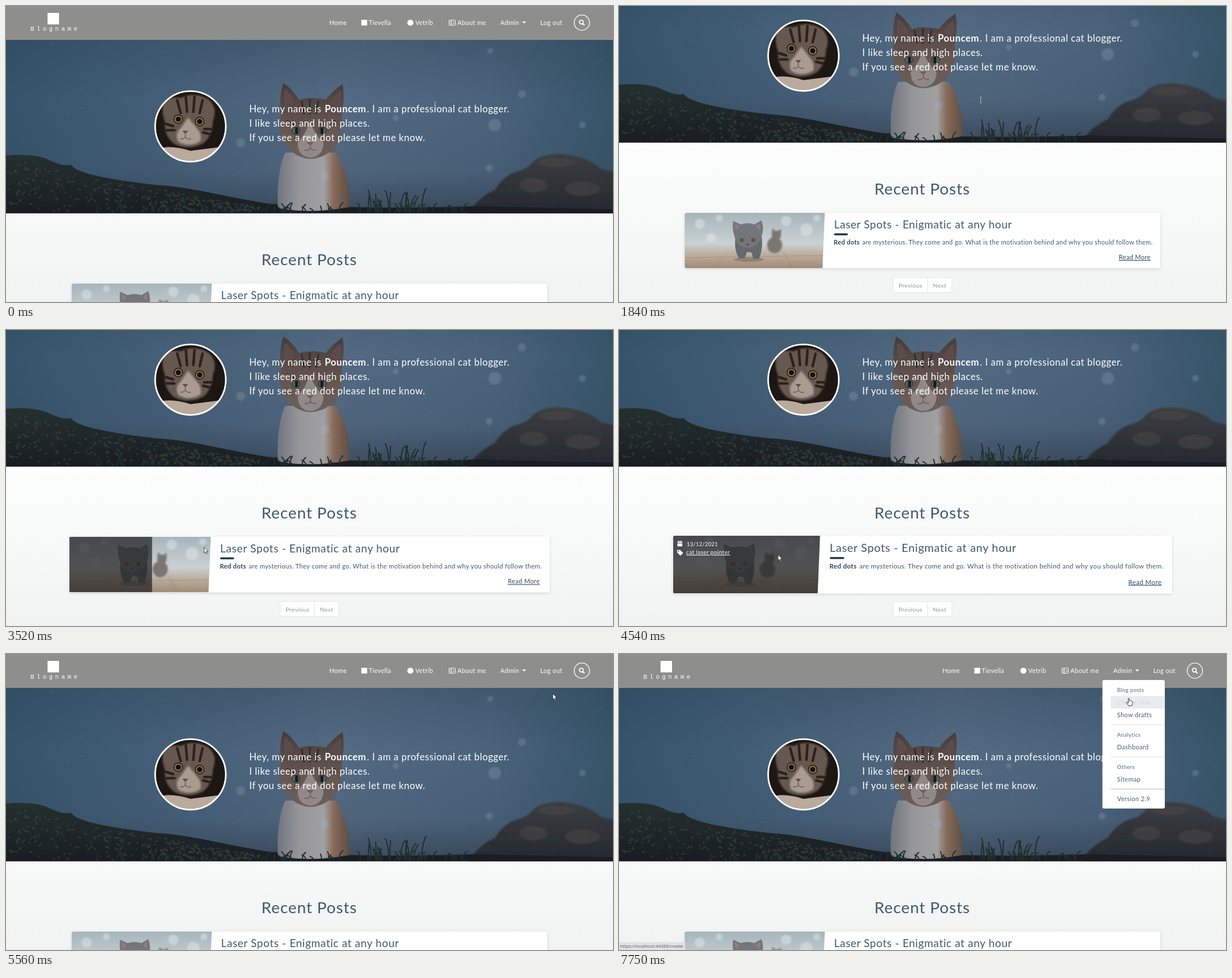
These frames come from a looping animation (1053x515 px, 8000 ms). An HTML page:

```html
<!DOCTYPE html>
<html lang="en">
<head>
<meta charset="utf-8">
<title>Blog</title>
<style>
html, body { margin: 0; width: 100%; height: 100%; overflow: hidden; background: #fff; }
svg { position: absolute; left: 0; top: 0; width: 100%; height: 100%; display: block; }
text { font-family: Lato, "Open Sans", sans-serif; font-size: 10.9px; letter-spacing: .031em; white-space: pre; }
.nav text { fill: #fff; }
.hero text { fill: #fff; font-size: 16.5px; }
.bold { font-weight: 700; }
.ink { fill: #3f5a70; }
text.h1 { font-size: 27.6px; }
text.h2 { font-size: 18.8px; }
text.page { font-size: 10.3px; fill: #8d9994; }
text.head { font-size: 9.6px; fill: #566d7a; }
text.item { fill: #4a6271; }
text.item.on { fill: #d3d9cc; }
text.logo { font: 10.5px "Liberation Mono", monospace; letter-spacing: 4.4px; }
#status { position: absolute; left: 0; bottom: 0; height: 14px; box-sizing: border-box; padding: 0 4px 0 2px;
  font: 7.8px/14px "Open Sans", sans-serif; color: #555a5e; background: #dfe1e4; border-radius: 0 2px 0 0; white-space: nowrap; }
</style>
</head>
<body>
<svg viewBox="0 0 1053 515" preserveAspectRatio="none">
  <defs>
    <linearGradient id="paper" x2="0" y2="1"><stop offset=".4" stop-color="#fff"/><stop offset="1" stop-color="#f1f3f3"/></linearGradient>
    <linearGradient id="sky"><stop stop-color="#35536a"/><stop offset=".25" stop-color="#445f77"/><stop offset=".55" stop-color="#536a82"/><stop offset=".8" stop-color="#4a637b"/><stop offset="1" stop-color="#375469"/></linearGradient>
    <linearGradient id="dusk" x2="0" y2="1"><stop stop-color="#2a4152" stop-opacity=".3"/><stop offset=".35" stop-color="#2a4152" stop-opacity="0"/><stop offset=".75" stop-color="#2a3542" stop-opacity=".1"/><stop offset="1" stop-color="#222a33" stop-opacity=".5"/></linearGradient>
    <linearGradient id="rock" x2="0" y2="1"><stop stop-color="#3b3d41"/><stop offset="1" stop-color="#23282d"/></linearGradient>
    <linearGradient id="soil" x2="0" y2="1"><stop stop-color="#24302f"/><stop offset="1" stop-color="#191d22"/></linearGradient>
    <linearGradient id="fur" x2="0" y2="1"><stop stop-color="#463c3c"/><stop offset=".6" stop-color="#66564f"/><stop offset="1" stop-color="#6b5f5b"/></linearGradient>
    <linearGradient id="chest"><stop stop-color="#70757e"/><stop offset=".3" stop-color="#969599"/><stop offset=".65" stop-color="#a09fa1"/><stop offset=".78" stop-color="#866a58"/><stop offset="1" stop-color="#5f4e45"/></linearGradient>
    <linearGradient id="room" x2="0" y2="1"><stop stop-color="#a6b5bb"/><stop offset=".55" stop-color="#c9d1d3"/><stop offset=".72" stop-color="#bfb4a6"/><stop offset="1" stop-color="#a08a75"/></linearGradient>
    <filter id="soft"><feGaussianBlur stdDeviation="1.6"/></filter>
    <filter id="shade" x="-5%" y="-20%" width="110%" height="150%"><feDropShadow dx="0" dy="1.5" stdDeviation="2.5" flood-opacity=".14"/></filter>
    <clipPath id="heroClip"><path d="M0 59H1053V360.500H0z"/></clipPath>
    <clipPath id="faceClip"><circle cx="320" cy="209.500" r="61"/></clipPath>
    <clipPath id="photoClip"><path d="M117 483H357L353 579H117q-3 0-3-3V486q0-3 3-3z"/></clipPath>
  </defs>

  <rect width="1053" height="515" fill="url(#paper)"/>

  <g id="site">
    <g class="hero" clip-path="url(#heroClip)">
      <rect y="59" width="1053" height="302" fill="url(#sky)"/>
      <rect y="59" width="1053" height="302" fill="url(#dusk)"/>
      <g filter="url(#soft)">
        <path d="M800 365Q815 335 848 320Q862 296 885 288Q905 284 915 270Q935 255 965 258Q1010 262 1030 282L1060 290V365z" fill="url(#rock)"/>
        <g fill="#4c4848" opacity=".55"><ellipse cx="955" cy="272" rx="32" ry="8"/><ellipse cx="915" cy="312" rx="24" ry="12"/><ellipse cx="1000" cy="318" rx="30" ry="12"/></g>
      </g>
      <path d="M0 260Q50 256 75 268T112 276Q122 290 180 300T270 312T360 326T450 343T600 350T820 348L1053 354V361H0z" fill="url(#soil)"/>
      <g id="cat">
        <path d="M484 255Q468 295 472 352Q530 362 595 350Q600 300 572 255z" fill="url(#chest)"/>
        <path d="M481 134Q473 160 477 190Q470 220 487 245Q505 265 528 266Q556 264 572 244Q586 222 582 192Q588 160 584 136Q568 146 555 163Q530 157 508 163Q497 144 481 134z" fill="url(#fur)"/>
        <path d="M484 145Q480 165 484 180L501 166Q493 152 484 145zM580 147Q584 166 579 180L562 167Q572 153 580 147z" fill="#5d4b4b"/>
        <path d="M527 200Q521 222 506 238Q506 262 528 264Q550 262 551 238Q534 222 527 200z" fill="#918987"/>
        <path d="M513 166L517 187M527 163V188M542 166L538 187M488 200L500 207M570 200L558 207" stroke="#352d2e" stroke-width="3" stroke-linecap="round"/>
        <g fill="#4b6663" stroke="#232629"><ellipse cx="503" cy="217" rx="7" ry="6"/><ellipse cx="549" cy="217" rx="7" ry="6"/></g>
        <path d="M504 214v6M548 214v6" stroke="#161a1d" stroke-width="5" stroke-linecap="round"/>
        <path d="M521 237H534L528 243z" fill="#7a5a57"/>
        <path d="M528 243V248M518 251Q525 252 528 248Q532 252 538 251" fill="none" stroke="#4d4040"/>
      </g>
      <path id="leaves" stroke="#33463a" stroke-width="3" stroke-linecap="round" opacity=".65"/>
      <path id="twigs" stroke="#413c3b" stroke-width="2.500" stroke-linecap="round" opacity=".65"/>
      <path id="blades" fill="none" stroke="#202f2d" stroke-width="2" stroke-linecap="round"/>
      <g fill="#a9bccb" opacity=".22" filter="url(#soft)"><circle cx="848" cy="207" r="11"/><circle cx="407" cy="238" r="8"/><circle cx="553" cy="296" r="8"/><circle cx="895" cy="153" r="7"/><circle cx="1000" cy="207" r="6"/><circle cx="840" cy="78" r="5"/><circle cx="676" cy="195" r="5"/><circle cx="838" cy="282" r="6"/></g>
      <path id="flakes" stroke="#b4c3d0" stroke-width="1.300" stroke-linecap="round" opacity=".35"/>

      <g clip-path="url(#faceClip)">
        <rect x="257" y="147" width="126" height="126" fill="#1d1714"/>
        <path d="M257 250Q285 240 320 252L383 244V273H257z" fill="#b9aa9c"/>
        <g filter="url(#soft)">
          <path d="M275 162Q268 182 276 202Q274 226 292 240Q318 252 342 239Q358 226 359 200Q368 178 352 163Q328 148 303 160Q288 158 275 162z" fill="#66594f"/>
          <path d="M304 212Q292 222 299 236Q318 247 337 235Q340 222 330 212L316 194z" fill="#a89c91"/>
        </g>
        <path d="M297 164L303 186M312 158L314 184M327 158L325 184M341 164L336 186M277 205L290 209M279 216L292 216M356 214L344 214M354 223L342 220" stroke="#2c221d" stroke-width="4.500" stroke-linecap="round"/>
        <g fill="#94794f" stroke="#1b1512" stroke-width="1.500"><circle cx="299" cy="197" r="7.500"/><circle cx="336" cy="201" r="7.500"/></g>
        <circle cx="299" cy="197" r="4.500" fill="#14100e"/><circle cx="336" cy="201" r="4.500" fill="#14100e"/>
        <path d="M306 217H316L311 223z" fill="#6d4b43"/>
        <path d="M311 223V228M302 231Q309 232 311 228Q315 233 321 231" fill="none" stroke="#4a3a32"/>
      </g>
      <circle cx="320" cy="209.500" r="61.300" fill="none" stroke="#fff" stroke-width="2.800"/>
      <text x="422" y="185">Hey, my name is</text>
      <text x="553" y="185" class="bold">Pouncem</text>
      <text x="626" y="185">. I am a professional cat blogger.</text>
      <text x="422" y="210">I like sleep and high places.</text>
      <text x="422" y="234.500">If you see a red dot please let me know.</text>
    </g>

    <g class="nav">
      <rect width="1053" height="59" fill="#8e8e8d"/>
      <rect x="72" y="12" width="20" height="20" fill="#fff"/>
      <text x="42.500" y="43" class="logo">Blogname</text>
      <text x="561" y="33">Home</text>
      <rect x="616.500" y="24" width="10" height="10" fill="#fff"/>
      <text x="629" y="33">Tievella</text>
      <circle cx="701.500" cy="29" r="5.300" fill="#fff"/>
      <text x="710" y="33">Vetrib</text>
      <g fill="none" stroke="#fff"><rect x="768.500" y="24.500" width="11" height="9" rx="1"/><path d="M775.500 28h2.500M775.500 30.500h2.500"/></g>
      <circle cx="772" cy="27.500" r="1.400" fill="#fff"/><path d="M769.800 32q2.200-4 4.400 0z" fill="#fff"/>
      <text x="783" y="33">About me</text>
      <text x="857.500" y="33">Admin</text>
      <path d="M895.500 27H902.500L899 30.500z" fill="#fff"/>
      <text x="927" y="33">Log out</text>
      <g fill="none" stroke="#fff"><circle cx="999" cy="29" r="13.300" stroke-width="1.300"/><circle cx="998" cy="28" r="3.300" stroke-width="1.800"/><path d="M1000.500 30.500L1003.500 33.500" stroke-width="2.200"/></g>
    </g>

    <text x="443" y="451" class="h1 ink">Recent Posts</text>

    <g id="card">
      <rect x="114" y="483" width="825" height="96" rx="3" fill="#fff" filter="url(#shade)"/>
      <g clip-path="url(#photoClip)">
        <rect x="114" y="483" width="244" height="96" fill="url(#room)"/>
        <g fill="#e6eced" opacity=".45" filter="url(#soft)"><circle cx="140" cy="502" r="9"/><circle cx="174" cy="492" r="6"/><circle cx="160" cy="526" r="8"/><circle cx="290" cy="497" r="9"/><circle cx="325" cy="512" r="11"/><circle cx="343" cy="492" r="6"/></g>
        <path d="M114 561L358 557M165 579L190 550M300 579L285 550" stroke="#8b7562" opacity=".4"/>
        <g fill="#7b7672" filter="url(#soft)"><ellipse cx="270" cy="539" rx="13" ry="14"/><circle cx="273" cy="522" r="8"/><path d="M265 521L266 510L273 516L281 511L281 522z"/></g>
        <ellipse cx="225" cy="564" rx="26" ry="4" fill="#6f5b4c" opacity=".45"/>
        <path d="M203 520Q198 545 208 562H218L222 551L230 552L233 563H243Q252 540 246 518z" fill="#65686d"/>
        <path d="M198 497Q196 512 200 522Q203 541 223 544Q243 542 248 522Q252 508 247 496L235 503Q223 499 211 503z" fill="#73767b"/>
        <path d="M201 502L202 514L209 506zM245 501L245 513L237 506z" fill="#927f7d"/>
        <g fill="#c99b55" stroke="#313338"><circle cx="213" cy="530" r="3.200"/><circle cx="233" cy="530" r="3.200"/></g>
        <circle cx="213" cy="530" r="1.500"/><circle cx="233" cy="530" r="1.500"/>
        <path d="M220 537H226L223 540z" fill="#3c3d41"/>
        <g id="cover">
          <rect x="114" y="483" width="245" height="96" fill="#222" opacity=".72"/>
          <g fill="#fff">
            <path d="M121 493h1.500v-1.500h1.500v1.500h2v-1.500h1.500v1.500h1.500v2h-8zM121 496h8v5h-8z"/>
            <path d="M120.500 507h5l5 5l-4.500 4.500l-5.500-5.500z"/><circle cx="122.800" cy="509.200" r="1" fill="#444"/>
            <text x="136.500" y="500.500" style="font-size:8.800px">13/12/2021</text>
            <text x="135.500" y="514" style="font-size:9.600px" text-decoration="underline">cat laser pointer</text>
          </g>
        </g>
      </g>
      <text x="373" y="510" class="h2 ink">Laser Spots - Enigmatic at any hour</text>
      <rect x="373" y="518.500" width="24" height="3.500" rx="1.700" fill="#233f45"/>
      <text x="372.500" y="538" class="bold" fill="#2c4558">Red dots</text>
      <text x="422" y="538" class="ink">are mysterious. They come and go. What is the motivation behind and why you should follow them.</text>
      <text x="867" y="564" fill="#2f4a5f" text-decoration="underline">Read More</text>
    </g>

    <rect x="475.500" y="595.500" width="102" height="26" rx="3" fill="#fff" stroke="#e2e5e6"/>
    <path d="M535.500 596V621" stroke="#e2e5e6"/>
    <text x="485" y="612.500" class="page">Previous</text>
    <text x="544.500" y="612.500" class="page">Next</text>
  </g>

  <g id="menu">
    <rect x="838.500" y="45" width="108.500" height="224" rx="3" fill="#fff" stroke="#000" stroke-opacity=".15"/>
    <rect id="glow" x="853" width="94" height="22" fill="#e9ecef"/>
    <path d="M853 123H947M853 179H947" stroke="#dcdfe1"/><path d="M853 235H947" stroke="#b9bcbe"/>
    <text x="864" y="65.500" class="head">Blog posts</text>
    <text x="864" y="88" class="item" data-link="create">Create new</text>
    <text x="864" y="110" class="item" data-link="drafts">Show drafts</text>
    <text x="864" y="143.500" class="head">Analytics</text>
    <text x="864" y="166" class="item" data-link="dashboard">Dashboard</text>
    <text x="864" y="199.500" class="head">Others</text>
    <text x="864" y="222" class="item" data-link="sitemap">Sitemap</text>
    <text x="864" y="256" class="item">Version 2.9</text>
  </g>
</svg>
<div id="status"></div>
<svg viewBox="0 0 1053 515" preserveAspectRatio="none">
  <g id="pointer">
    <path id="beam" d="M-2-5H-.6L0-4.500L.6-5H2M0-4.500V4.500M-2 5H-.6L0 4.500L.6 5H2" fill="none" stroke="#b3bac0"/>
    <path id="arrow" d="M0 0V10L2.300 7.900L3.900 11.500L5.500 10.800L4 7.300H7z" fill="#fff" stroke="#222" stroke-width=".8"/>
    <path id="hand" d="M-1 1Q0-.5 1 1V5Q2.300 4 3 5.200Q4.300 4.500 5 6Q6.300 5.600 6.300 7V10L5 13.500H-.5L-4 8.500Q-3.800 6.800-2.300 7.800L-1 9z" fill="#fff" stroke="#222" stroke-width=".9"/>
  </g>
</svg>
<script>
const LOOP = 8000, STEP = 170;
const $ = id => document.getElementById(id);

// Bursts of picture changes: start, end, count
const starts = [
  [0, 0, 1], [170, 320, 2], [1150, 1840, 5], [2490, 3520, 7], [3690, 4710, 7],
  [4880, 5900, 7], [6070, 6070, 1], [6400, 6740, 3], [7070, 7750, 5]
].flatMap(([a, b, n]) => Array.from({ length: n }, (_, i) => i === n - 1 ? b : a + STEP * i));

// Tracks: time, then values
const scroll = [[1320, 0], [1490, 2], [1660, 72], [1830, 123], [4540, 123], [4710, 72], [4880, 9], [5050, 0]];
const grow = [[3340, 0], [3520, .2], [3690, .76], [3860, .97], [4540, .97], [4710, .8], [4880, .24], [5050, 0]];
const slide = [[3340, 0], [3520, .58], [3690, 1], [4540, 1], [4710, .5], [4880, 0]];
const path = [
  [0, 744.5, 172], [170, 740, 172], [320, 737.5, 172], [980, 737.5, 172], [1150, 705, 168], [1320, 640, 164],
  [1490, 626.5, 163], [1840, 627.5, 163.5], [2320, 627.5, 163.5], [2490, 622, 215], [2660, 600, 335],
  [2830, 530, 465], [3010, 430, 500], [3180, 380, 490], [3340, 352, 462], [3520, 343.5, 378],
  [3690, 320, 386], [4030, 285, 391], [4540, 276, 391], [4710, 284, 386], [4880, 420, 310], [5050, 600, 220],
  [5220, 790, 130], [5390, 920, 85], [5560, 948.5, 69], [5730, 935, 52], [5900, 903, 32], [6070, 893, 26],
  [6240, 893, 26], [6400, 889, 60], [6570, 886, 140], [6740, 884, 215], [6900, 884, 215],
  [7070, 884, 200], [7240, 884, 160], [7410, 884, 118], [7580, 884, 86], [7750, 884.5, 76.5]
];
const shapes = [[0, 'beam'], [1490, 'arrow'], [1660, 'beam'], [2490, 'arrow'], [5900, 'hand'], [6400, 'arrow'],
  [6740, 'hand'], [7070, 'arrow'], [7240, 'hand'], [7410, 'arrow'], [7580, 'hand']];
const links = [[0, ''], [6070, '#'], [6740, 'sitemap'], [7070, ''], [7240, 'dashboard'], [7410, ''], [7580, 'create']];

const held = (keys, t) => keys.findLast(k => k[0] <= t)[1];

function at(keys, t) {
  const i = keys.findIndex(k => k[0] > t);
  if (i === 0) return keys[0].slice(1);
  if (i < 0) return keys.at(-1).slice(1);
  const a = keys[i - 1], b = keys[i], f = (t - a[0]) / (b[0] - a[0]);
  return a.slice(1).map((v, j) => v + (b[j + 1] - v) * f);
}

let seed = 7;
const rnd = (a, b) => {
  seed = (seed * 16807) % 2147483647;
  return a + (b - a) * seed / 2147483647;
};
const scatter = (id, n, make) => $(id).setAttribute('d', Array.from({ length: n }, make).join(''));
const ground = x => Math.min(346, 264 + x * .19);
const bit = () => {
  const x = rnd(0, 440);
  return `M${x} ${rnd(ground(x) + 4, 358)}l${rnd(-4, 4)} ${rnd(-3, 3)}`;
};

scatter('leaves', 170, bit);
scatter('twigs', 110, bit);
scatter('flakes', 150, () => `M${rnd(0, 1053)} ${rnd(62, 350)}h.01`);
scatter('blades', 85, (_, i) => {
  const tuft = i < 22;
  const x = tuft ? rnd(625, 725) : rnd(150, 820);
  const h = tuft ? rnd(12, 42) : rnd(5, 16);
  const lean = rnd(-11, 11);
  return `M${x} 358q${lean * .1} ${-h * .7} ${lean} ${-h}`;
});

const items = [...document.querySelectorAll('[data-link]')];

function draw(now) {
  const clock = now % LOOP;
  const t = starts.findLast(s => s <= clock);
  const k = 1 + .05 * at(grow, t)[0];
  const [x, y] = at(path, t);
  const shape = held(shapes, t), link = held(links, t);

  $('site').setAttribute('transform', `translate(0 ${-at(scroll, t)[0]})`);
  $('card').setAttribute('transform', `translate(526.5 531) scale(${k}) translate(-526.5 -531)`);
  $('cover').setAttribute('transform', `translate(${245 * (at(slide, t)[0] - 1)} 0)`);
  $('pointer').setAttribute('transform', `translate(${x} ${y})`);
  for (const id of ['beam', 'arrow', 'hand']) $(id).style.display = id === shape ? '' : 'none';

  $('menu').style.display = t >= 6070 ? '' : 'none';
  const active = items.find(el => el.dataset.link === link);
  items.forEach(el => el.classList.toggle('on', el === active));
  $('glow').style.display = active ? '' : 'none';
  if (active) $('glow').setAttribute('y', active.getAttribute('y') - 15);

  $('status').style.display = link ? '' : 'none';
  $('status').textContent = 'https://localhost:44389/' + link;
}

const began = performance.now();
function tick() {
  draw(performance.now() - began);
  requestAnimationFrame(tick);
}
tick();
</script>
</body>
</html>
```
